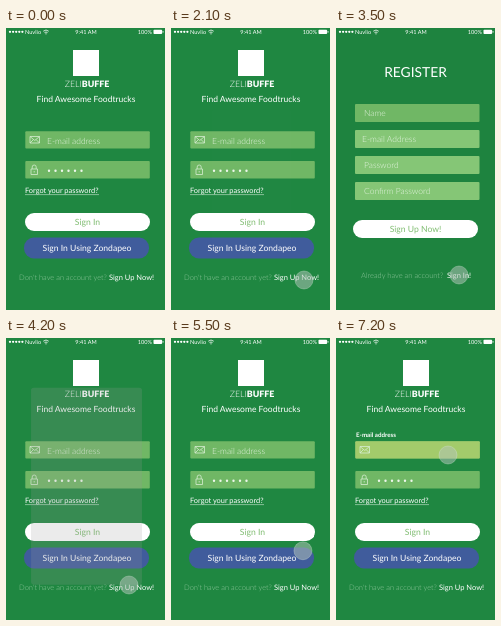
An HTML page for the animation above (8000 ms loop, 159 by 282 pixels).

```html
<!DOCTYPE html>
<html lang="en">
<head>
<meta charset="utf-8">
<title>Sign in and register</title>
<style>
html, body { margin: 0; height: 100%; overflow: hidden; background: #1f8741; }
svg { display: block; width: 100vw; height: 100vh; }
text { font-family: Lato, "Open Sans", sans-serif; fill: #fff; text-rendering: geometricPrecision; }
.mid { text-anchor: middle; }
.light { font-weight: 300; }
.hint { font-weight: 300; font-size: 8.5px; fill: #e6f5e2; }
.note { font-size: 7.5px; }
.faint { font-weight: 300; fill: #8fc79c; }
.btn { font-size: 8.6px; }
.leaf { fill: #80bd72; }
.field { fill: #70b765; }
.pale { fill: #85c676; }
.line { fill: none; stroke: #d5ecd0; stroke-width: .8; }
</style>
</head>
<body>
<svg viewBox="0 0 159 282">
  <rect width="159" height="282" fill="#1f8741"/>

  <g id="login">
    <rect x="67" y="22" width="26" height="26" fill="#fff"/>
    <text class="mid" x="81" y="58.5" font-size="8.8"><tspan class="light">ZELI</tspan><tspan font-weight="900">BUFFE</tspan></text>
    <text class="mid" x="80" y="73.5" font-size="8.5">Find Awesome Foodtrucks</text>

    <rect class="field" x="19.3" y="103.2" width="124.5" height="17.4" rx="1"/>
    <rect id="glow" x="19.3" y="103.2" width="124.5" height="17.4" rx="1" fill="#a3cb6b"/>
    <path class="line" d="M24 108.5h9.5v6.5h-9.5zl4.75 4 4.75-4M24 115l3.5-3.5M33.5 115l-3.5-3.5"/>
    <text id="label" class="hint">E-mail address</text>
    <path id="caret" d="M42.3 108v9.5" stroke="#fff" stroke-width=".8"/>

    <rect class="field" x="19.3" y="133" width="124.5" height="17.4" rx="1"/>
    <path class="line" d="M25 141h6.5v5.5h-6.5zM26.2 141v-2a2 2 0 0 1 4 0v2M28.2 143v1.5"/>
    <path d="M43 142.7h33" stroke="#edf7ea" stroke-width="2.4" stroke-linecap="round" stroke-dasharray="0 6.5"/>

    <text x="19" y="165" font-size="7.4">Forgot your password?</text>
    <path d="M19 166.6h74" stroke="#c9e4ce" stroke-width=".6"/>

    <rect x="19" y="185" width="125" height="18" rx="9" fill="#fff"/>
    <text class="btn leaf mid" x="81.5" y="197">Sign In</text>
    <rect x="18" y="209.5" width="125" height="21" rx="10" fill="#405c9c"/>
    <text class="btn mid" x="81" y="223">Sign In Using Zondapeo</text>
    <text class="note faint" x="13" y="251.5">Don't have an account yet?</text>
    <text class="note" x="103" y="251.5">Sign Up Now!</text>
  </g>

  <rect id="panel" width="159" height="282" rx="4" fill="#999"/>

  <g id="register">
    <rect width="159" height="282" fill="#1e833f"/>
    <text class="mid" x="79.5" y="49" font-size="13.8">REGISTER</text>
    <rect class="field" x="19" y="76" width="124.5" height="18" rx="1"/>
    <rect class="pale" x="19" y="102" width="124.5" height="18" rx="1"/>
    <rect class="pale" x="19" y="128" width="124.5" height="18" rx="1"/>
    <rect class="pale" x="19" y="154" width="124.5" height="18" rx="1"/>
    <text class="hint" x="28" y="88">Name</text>
    <text class="hint" x="26" y="114">E-mail Address</text>
    <text class="hint" x="28" y="140">Password</text>
    <text class="hint" x="28" y="166">Confirm Password</text>
    <rect x="17" y="192" width="125" height="18" rx="9" fill="#fff"/>
    <text class="btn leaf mid" x="79.5" y="204">Sign Up Now!</text>
    <text class="note faint" x="25" y="250">Already have an account?</text>
    <text class="note" x="111" y="250">Sign In!</text>
  </g>

  <g id="status" font-size="5.6">
    <path d="M4 3.8h13" stroke="#fff" stroke-width="2.3" stroke-linecap="round" stroke-dasharray="0 3.1"/>
    <text x="19" y="6">Nuvlio</text>
    <path d="M37.3 3.2q2.7-2.4 5.4 0M38.5 4.6q1.5-1.2 3 0" fill="none" stroke="#fff" stroke-width=".8"/>
    <circle cx="40" cy="5.8" r=".6" fill="#fff"/>
    <text class="mid" x="80" y="6">9:41 AM</text>
    <text x="146" y="6" text-anchor="end">100%</text>
    <rect x="147.5" y="1.7" width="8.6" height="4.3" rx=".8" fill="#fff"/>
    <path d="M157 3v1.7" stroke="#fff" stroke-width=".8"/>
  </g>

  <circle id="cursor" r="9" fill="#b4c4ba" fill-opacity=".52" stroke="#d8eadc" stroke-opacity=".4" stroke-width=".8"/>
</svg>
<script>
const LOOP = 8000;
const el = id => document.getElementById(id);
const [panel, register, glow, label, caret, cursor] =
  ['panel', 'register', 'glow', 'label', 'caret', 'cursor'].map(el);

const part = (t, from, to) => Math.min(1, Math.max(0, (t - from) / (to - from)));
const easeOut = p => 1 - (1 - p) ** 3;
const smooth = p => p * p * (3 - 2 * p);
const mix = (a, b, p) => a + (b - a) * p;

// Pointer stops: time, x, y
const stops = [
  [1050, 172, 252], [1300, 156, 252], [1650, 156, 252], [1900, 133, 252],
  [2950, 133, 252], [3500, 123, 247], [5350, 123, 247], [5500, 132, 213],
  [6200, 112, 117]
];

function pointer(t) {
  let [, x, y] = stops[0];
  for (let i = 1; i < stops.length; i++) {
    const [from, x0, y0] = stops[i - 1], [to, x1, y1] = stops[i];
    if (t < from) break;
    const p = part(t, from, to), e = i === stops.length - 1 ? 1 - (1 - p) ** 2 : smooth(p);
    x = mix(x0, x1, e);
    y = mix(y0, y1, e);
  }
  return [x, y];
}

// A grey panel grows or shrinks behind the register screen while that fades
function drawRegister(t) {
  const leaving = t >= 4050;
  const p = leaving ? part(t, 4050, 4300) : 1 - easeOut(part(t, 2100, 2480));
  const scale = 1 - .5 * p;
  panel.setAttribute('opacity', .5 * (1 - p));
  panel.setAttribute('transform',
    `translate(80.5 ${141 + 12 * p}) scale(${scale}) translate(-79.5 -141)`);
  register.setAttribute('opacity', 1 - part(p, 0, .55));
}

function drawFocus(t) {
  const s = Math.max(0, t - 6200) / 1000;
  const p = 1 - Math.exp(-13 * s) * Math.cos(13 * s);
  glow.setAttribute('opacity', easeOut(part(t, 6180, 6420)));
  label.setAttribute('transform',
    `translate(${mix(41, 20, p)} ${mix(115.5, 98.5, p)}) scale(${mix(1, .73, p)})`);
  label.style.fontWeight = t < 6250 ? 300 : t < 6700 ? 400 : 700;
  label.style.fill = t < 6250 ? '' : '#fff';
  caret.setAttribute('opacity', t >= 6300 && t < 6900 ? 1 : 0);
}

function draw(now) {
  const t = now % LOOP;
  drawRegister(t);
  drawFocus(t);
  cursor.setAttribute('transform', `translate(${pointer(t)})`);
  requestAnimationFrame(draw);
}
draw(0);
</script>
</body>
</html>
```
